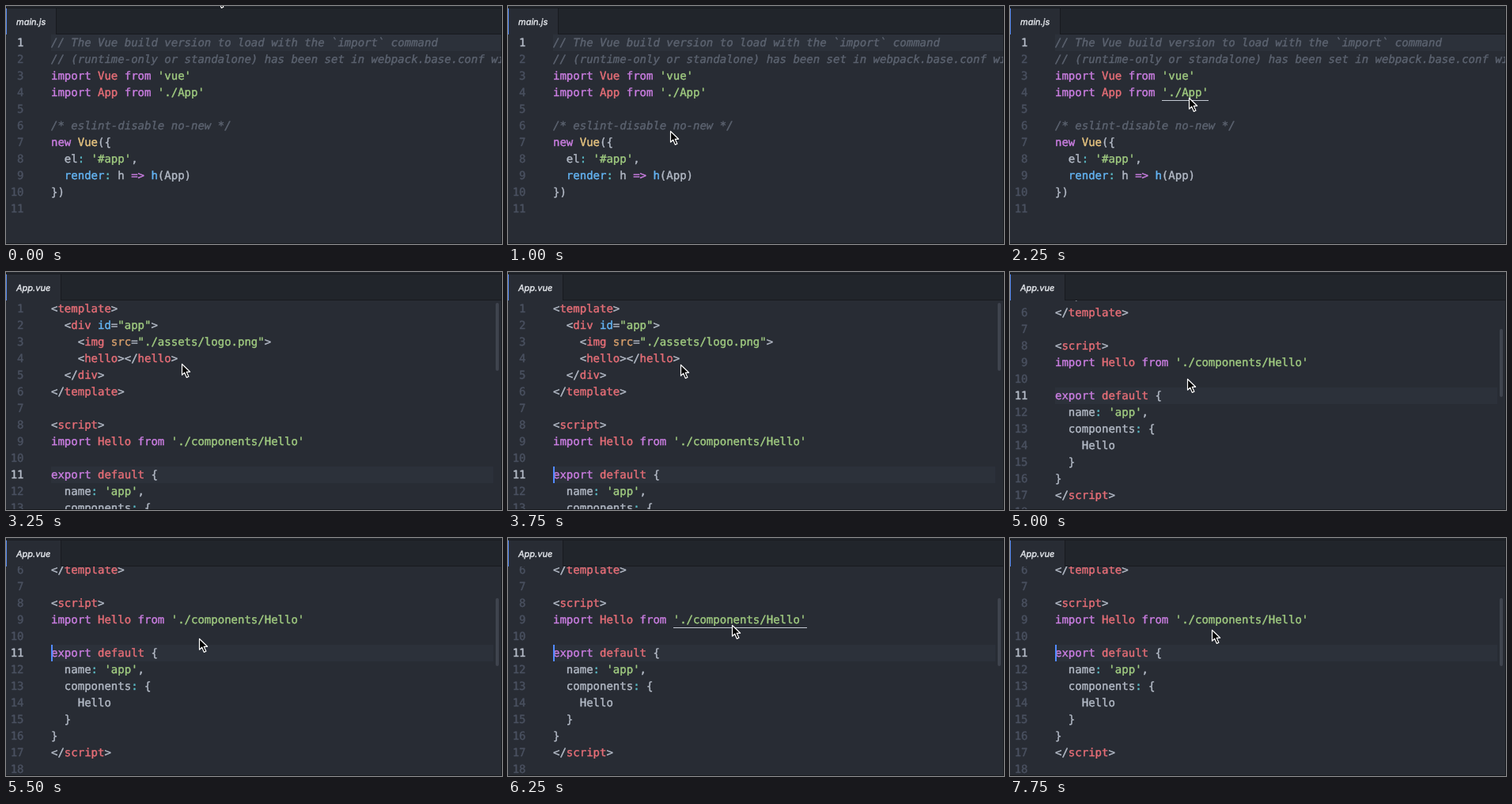
Write an HTML page with a canvas that moves like this. It is 627 by 301 pixels and loops after 8000 ms.

```html
<!DOCTYPE html>
<html lang="en">
<head>
<meta charset="utf-8">
<title>Jump to import</title>
<style>
  html, body { margin: 0; width: 100%; height: 100%; overflow: hidden; background: #282c34; }
  canvas { display: block; }
</style>
</head>
<body>
<canvas id="stage" width="627" height="301"></canvas>
<script>
const W = 627, H = 301, LOOP = 8000, STEP = 250;
const TOP = 36, LINE = 21, LEFT = 57, GUTTER = 22.5;
const MONO = "14px 'DejaVu Sans Mono', 'Liberation Mono', monospace";
const ctx = document.getElementById('stage').getContext('2d');
ctx.textRendering = 'geometricPrecision';
ctx.lineJoin = 'round';

// Keys used in the marked-up code lines: key|text|key|text...
const INK = {
  t: '#b3bac6', c: '#5c6370', p: '#cb7ee2', r: '#e66e77', g: '#a0cb80',
  y: '#e8c580', b: '#64b5f4', o: '#d59e6b', k: '#59b9c4'
};

const tag = (open, name) => `t|${open}|r|${name}|t|>`;

const mainFile = {
  name: 'main.js', tabWidth: 64, current: 1, link: { line: 4, col: 16, length: 7 },
  lines: [
    'c|// The Vue build version to load with the `import` command',
    'c|// (runtime-only or standalone) has been set in webpack.base.conf with an alias.',
    "p|import |r|Vue |p|from |g|'vue'",
    "p|import |r|App |p|from |g|'./App'",
    '',
    'c|/* eslint-disable no-new */',
    'p|new |y|Vue|t|({',
    "t|  el|k|: |g|'#app'|t|,",
    'b|  render|k|: |t|h |p|=> |b|h|t|(App)',
    't|})',
    ''
  ]
};

const appFile = {
  name: 'App.vue', tabWidth: 70, current: 11, link: { line: 9, col: 18, length: 20 }, scrolls: true,
  lines: [
    tag('<', 'template'),
    't|  <|r|div |b|id|t|=|g|"app"|t|>',
    't|    <|r|img |o|src|t|=|g|"./assets/logo.png"|t|>',
    tag('    <', 'hello') + '|' + tag('</', 'hello'),
    tag('  </', 'div'),
    tag('</', 'template'),
    '',
    tag('<', 'script'),
    "p|import |r|Hello |p|from |g|'./components/Hello'",
    '',
    'p|export |r|default |t|{',
    "t|  name|k|: |g|'app'|t|,",
    't|  components|k|: |t|{',
    't|    Hello',
    't|  }',
    't|}',
    tag('</', 'script'),
    '',
    tag('<', 'style')
  ]
};

// [time, x, y] of the pointer tip and [time, offset] of the scroll
const pointerPath = [
  [0, 266, -15], [250, 256, 14], [500, 228, 90], [750, 200, 150], [1000, 205, 158],
  [1250, 220, 136], [1750, 225, 122], [2250, 226, 116], [2500, 226, 116],
  [3000, 224, 116], [3750, 218, 117], [4500, 223, 136], [5250, 225, 135],
  [5750, 262, 118], [6250, 283, 110], [6750, 281, 111], [7250, 261, 116],
  [7500, 255, 117], [7750, 255, 116]
];
const scrollPath = [[0, 0], [4250, 0], [4500, 3], [4750, 58], [5000, 100], [5250, 107], [5500, 111]];

function follow(path, t) {
  const next = path.findIndex(key => key[0] > t);
  if (next < 0) return path[path.length - 1].slice(1);
  const [a, b] = [path[next - 1], path[next]];
  const f = (t - a[0]) / (b[0] - a[0]);
  return a.slice(1).map((v, i) => Math.round(v + (b[i + 1] - v) * f));
}

function rect(color, x, y, w, h) {
  ctx.fillStyle = color;
  ctx.fillRect(x, y, w, h);
}

// Text with a hairline outline for a slightly heavier weight
function write(text, x, y, color) {
  ctx.fillStyle = ctx.strokeStyle = color;
  ctx.lineWidth = 0.4;
  ctx.fillText(text, x, y);
  ctx.strokeText(text, x, y);
}

function drawLine(markup, y) {
  const parts = markup.split('|');
  let x = LEFT;
  for (let i = 0; i + 1 < parts.length; i += 2) {
    ctx.font = (parts[i] === 'c' ? 'italic ' : '') + MONO;
    write(parts[i + 1], x, y, INK[parts[i]]);
    x += ctx.measureText(parts[i + 1]).width;
  }
}

function drawEditor(file, scroll, caretOn, linked) {
  const lineTop = n => TOP + (n - 1) * LINE - scroll;
  const right = file.scrolls ? 616 : W;
  ctx.save();
  ctx.beginPath();
  ctx.rect(0, TOP, W, H - TOP);
  ctx.clip();
  rect('#2c313a', LEFT, lineTop(file.current), right - LEFT, LINE);

  file.lines.forEach((markup, i) => {
    const y = lineTop(i + 1);
    ctx.font = MONO;
    ctx.textAlign = 'right';
    write(i + 1, GUTTER, y + 15, i + 1 === file.current ? INK.t : '#4a5160');
    ctx.textAlign = 'left';
    drawLine(markup, y + 15);
  });

  if (linked) {
    ctx.font = MONO;
    const em = ctx.measureText('0').width;
    const { line, col, length } = file.link;
    rect('#c4cad3', Math.round(LEFT + col * em), lineTop(line) + 20, Math.round(length * em), 1);
  }
  if (caretOn) rect('#528bff', LEFT, lineTop(file.current), 2, LINE);
  if (file.scrolls) {
    ctx.fillStyle = '#3f444e';
    ctx.beginPath();
    ctx.roundRect(619, 39 + Math.round(scroll / 3), 4, 86, 2);
    ctx.fill();
  }
  ctx.restore();
}

function drawTabs(file) {
  const border = '#181a1f';
  rect('#21252b', 0, 0, W, TOP);
  rect(border, 0, 2, W, 1);
  rect(border, 0, TOP - 1, W, 1);
  rect('#282c34', 0, 3, file.tabWidth - 1, TOP - 3);
  rect(border, file.tabWidth - 1, 3, 1, TOP - 3);
  rect('#568af2', 0, 3, 1, TOP - 3);
  ctx.font = "italic 11px Inter, 'Liberation Sans', sans-serif";
  write(file.name, 13, 24, '#e4e7ec');
  rect(border, W - 1, 0, 1, H);
  rect(border, 0, H - 1, W, 1);
}

const arrow = new Path2D('M.5 .5V14.2L3.7 11.2L6.4 17.4L8.9 16.3L6.2 10.3H10.6Z');

function drawPointer(x, y) {
  ctx.save();
  ctx.translate(x, y);
  ctx.fillStyle = '#000';
  ctx.strokeStyle = '#fff';
  ctx.lineWidth = 1.2;
  ctx.fill(arrow);
  ctx.stroke(arrow);
  ctx.restore();
}

function draw(t) {
  const file = t < 3000 ? mainFile : appFile;
  const linked = (t >= 1750 && t < 3000) || (t >= 6000 && t < 7000);
  const caretOn = file === appFile && (t + 400) % 800 < 400;
  rect('#282c34', 0, 0, W, H);
  drawEditor(file, follow(scrollPath, t)[0], caretOn, linked);
  drawTabs(file);
  drawPointer(...follow(pointerPath, t));
}

function tick() {
  const t = performance.now() % LOOP;
  draw(Math.floor(t / STEP) * STEP);
  requestAnimationFrame(tick);
}
tick();
</script>
</body>
</html>
```
